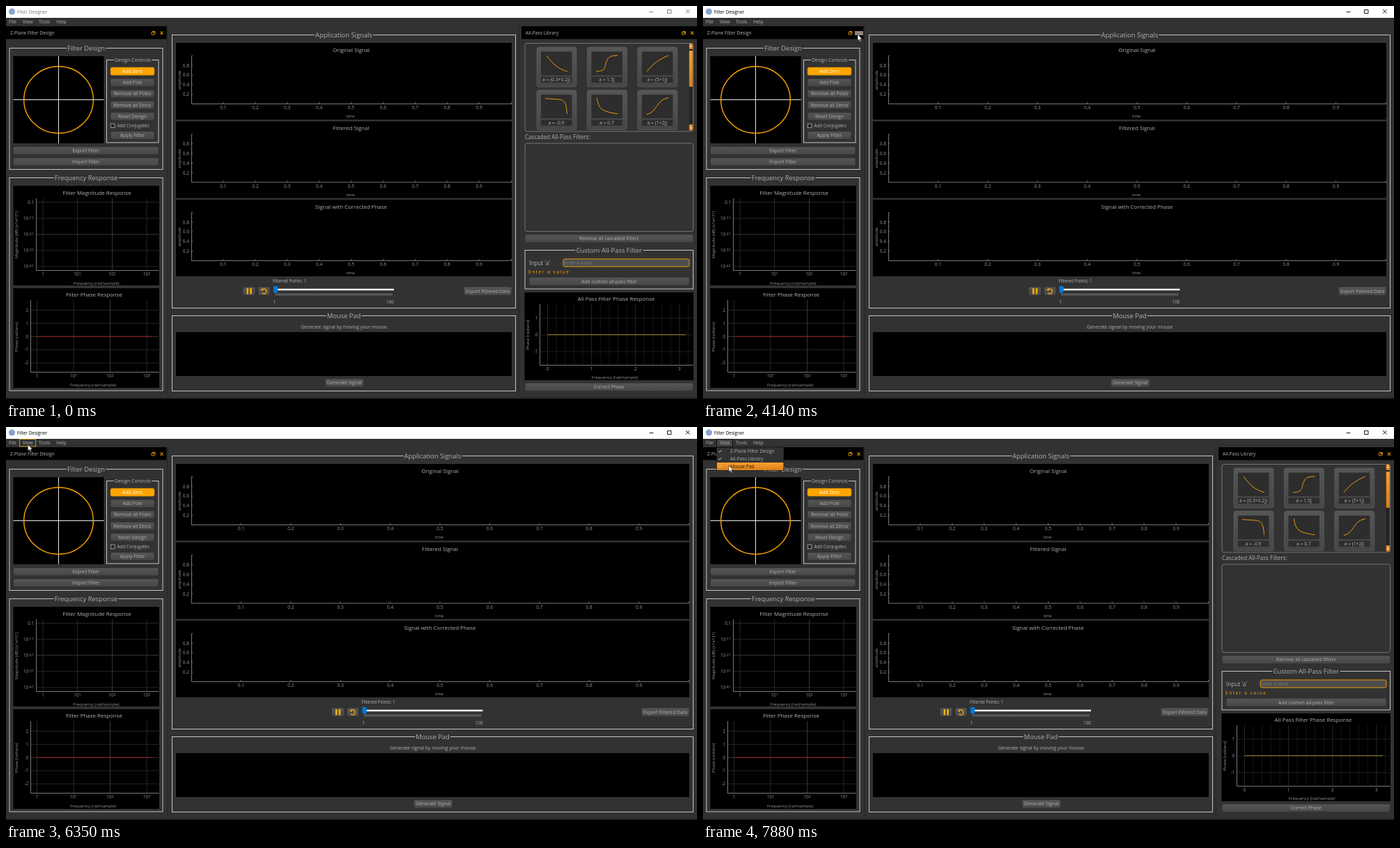
An HTML page that plays this animation: 992 by 564 pixels, repeating every 8 s.

```html
<!DOCTYPE html>
<html lang="en">
<head>
<meta charset="utf-8">
<title>Filter Designer</title>
<style>
html, body { margin: 0; width: 100%; height: 100%; overflow: hidden; background: #323232; }
svg { display: block; width: 100vw; height: 100vh; }
text { font-family: "Open Sans", "Noto Sans", sans-serif; white-space: pre; }
.layer { animation: 8s step-end infinite; }
#cursor { animation: move 8s linear infinite; }
</style>
</head>
<body>
<svg id="stage" viewBox="0 0 992 564" xmlns="http://www.w3.org/2000/svg"></svg>
<script>
const BG = '#323232', INK = '#b1b1b1', AXIS = '#969696', ORANGE = '#ffa500';
const LOOP = 8000;
const css = [];

// Drawing helpers: boxes take two corners, text takes its visual middle line.
const box = (x, y, x2, y2, fill, extra = '') =>
  `<rect x="${x}" y="${y}" width="${x2 - x}" height="${y2 - y}" fill="${fill}" ${extra}/>`;
const path = (d, color, w = 1, extra = '') =>
  `<path d="${d}" fill="none" stroke="${color}" stroke-width="${w}" ${extra}/>`;
const text = (x, y, s, size = 6.8, fill = INK, anchor = 'middle', extra = '') =>
  `<text x="${x}" y="${y + size * 0.36}" font-size="${size}" fill="${fill}" text-anchor="${anchor}" ${extra}>${s}</text>`;
const left = (x, y, s, size, fill, extra) => text(x, y, s, size, fill, 'start', extra);
const vertical = (x, y, s, size = 6) =>
  text(x, y, s, size, AXIS, 'middle', `transform="rotate(-90 ${x} ${y})"`);
const button = (x, y, x2, y2, s, on) =>
  box(x, y, x2, y2, on ? ORANGE : 'url(#btn)', `rx="2.5" stroke="${on ? '#c98200' : '#262626'}" stroke-width=".5"`) +
  text((x + x2) / 2, (y + y2) / 2, s, 6.8, on ? '#fff' : INK);
const group = (x, y, x2, y2, title, size = 9.4) =>
  box(x + .5, y + .5, x2 - .5, y2 - .5, 'none', 'stroke="#c4c4c4"') +
  text((x + x2) / 2, y + .3, title, size, INK, 'middle', `stroke="${BG}" stroke-width="4" paint-order="stroke"`);
const power = e => `10<tspan font-size="5.4" dy="-1.2">${e}</tspan>`;
const dockBar = (x, x2, s) =>
  box(x, 29, x2, 47.5, '#000') + left(x + 6, 38.7, s, 6.7) +
  path(`M${x2 - 21.5} 37.5h4v3.5h-4zM${x2 - 20.5} 36.5h4v3.5`, ORANGE, .8) +
  path(`M${x2 - 9} 36.5l4 4.5m0-4.5l-4 4.5`, ORANGE, 1.1);
const frame = (x, y, x2, y2) => box(x, y, x2, y2, 'none', 'rx="3" stroke="#858585" stroke-width=".8"');

// Wraps content in a layer shown only during the given [from, to] spans in ms.
let layers = 0;
function during(spans, content) {
  const name = 'show' + layers++;
  const at = (ms, v) => `${ms / LOOP * 100}%{visibility:${v}}`;
  let keys = spans[0][0] > 0 ? at(0, 'hidden') : '';
  for (const [from, to] of spans) keys += at(from, 'visible') + (to < LOOP ? at(to, 'hidden') : '');
  css.push(`@keyframes ${name}{${keys}}`);
  return `<g class="layer" style="animation-name:${name}">${content}</g>`;
}

function signalPlot(x, x2, y, title) {
  const ax = x + 22, end = x2 - 1, step = (end - ax) / 10, mid = (ax + end) / 2;
  let s = box(x, y, x2, y + 110, '#000') + text(mid, y + 10, title, 7.95);
  let d = `M${ax + 2} ${y + 18.5}H${ax + .5}V${y + 87.5}H${end + .5}v-2.5`;
  for (let i = 1; i < 10; i++) {
    d += `M${ax + i * step} ${y + 87}v-2`;
    s += text(ax + i * step, y + 92.8, '0.' + i, 6.6, AXIS);
  }
  for (let i = 1; i < 5; i++) {
    const ty = y + 87.5 - i * 13.8;
    d += `M${ax} ${ty}h2`;
    s += text(ax - 3, ty, '0.' + i * 2, 6.6, AXIS, 'end');
  }
  return s + path(d, AXIS, .8) + vertical(x + 5, y + 53.5, 'amplitude', 5.8) + text(mid - 1, y + 105, 'time', 5.8, AXIS);
}

function center(x, x2) {
  const c = (x + x2) / 2, px = x + 6, px2 = x2 - 6;
  let s = group(x, 41, x2, 434, 'Application Signals');
  ['Original Signal', 'Filtered Signal', 'Signal with Corrected Phase'].forEach((name, i) =>
    s += signalPlot(px, px2, 53 + i * 112.5, name));
  s += left(c - 102, 394.8, 'Filtered Points: 1', 6.2);
  s += button(c - 145, 403, c - 127, 415.5, '') + button(c - 123, 403, c - 106, 415.5, '');
  s += box(c - 139.5, 405, c - 137, 413.5, '#ffb000') + box(c - 134.8, 405, c - 132.3, 413.5, '#ffb000');
  s += path(`M${c - 117.5} 411.8A3.6 3.6 0 1 0 ${c - 117.6} 407.2`, '#ffb000', 1.3);
  s += `<path d="M${c - 119.6} 407.5l3.6 1.2.2-3.6z" fill="#ffb000"/>`;
  s += box(c - 99, 405.7, c + 72, 408.2, '#f0f0f0');
  s += path(`M${c - 98} 414H${c + 70}`, '#7c7c7c', 3, 'stroke-dasharray=".9 .8"');
  s += `<path d="M${c - 101} 402h6.2v8l-3.1 3-3.1-3z" fill="#0078d7"/>`;
  s += text(c - 99.5, 425, '1', 6.4) + text(c + 66.5, 425, '100', 6.4);
  s += button(px2 - 69, 403, px2, 415.5, 'Export Filtered Data');
  s += group(x, 444, x2, 553, 'Mouse Pad') + text(c, 461, 'Generate signal by moving your mouse');
  return s + box(px, 468, px2, 531, '#000') + button(c - 27, 535, c + 28.5, 547, 'Generate Signal');
}

function logPlot(o) {
  let s = box(10.5, o.y, 220, o.y + 143, '#000') + text(o.title[0], o.title[1], o.title[2], 7.95);
  const bottom = o.bottom + .5, ax = o.x + .5;
  o.rows.forEach(([ty, label], i) => {
    s += path(`M${ax} ${ty}H219`, i === 2 ? '#484848' : '#303030', .8);
    s += text(o.x - 3, ty, label, 6.2, AXIS, 'end');
  });
  o.cols.forEach((tx, i) => {
    s += path(`M${tx} ${o.top}V${bottom}`, i === 2 ? '#444' : '#303030', .8);
    s += text(tx, bottom + 5.2, i ? power(i === 3 ? 3 : i) : '1', 6.2, AXIS);
  });
  return s + path(`M${ax} ${o.top}V${bottom}H219.5`, AXIS, .8) +
    text(o.mid, bottom + 18, 'Frequency (rad/sample)', 6, AXIS) + vertical(15, o.rows[2][0] + .5, o.label);
}

function leftDock() {
  let s = dockBar(0, 230.5, 'Z-Plane Filter Design') + box(231, 29, 232.3, 559, '#282828');
  s += group(4.5, 60, 225.5, 235, 'Filter Design') + box(10.5, 72, 140.5, 197, '#000');
  s += path('M75.5 72V197M10.5 134.5H140.5', '#e8e8e8');
  s += `<ellipse cx="75.5" cy="134.7" rx="49.8" ry="47.9" fill="none" stroke="${ORANGE}" stroke-width="1.4"/>`;
  s += group(144, 77, 219.5, 196.5, 'Design Controls', 7);
  ['Add Zero', 'Add Pole', 'Remove all Poles', 'Remove all Zeros', 'Reset Design'].forEach((name, i) =>
    s += button(150, 88 + i * 16.2, 213, 99.3 + i * 16.2, name, i === 0));
  s += box(150.3, 169, 156, 174.7, '#222', `stroke="${INK}" stroke-width=".8"`) + left(159.5, 172, 'Add Conjugates', 6.3);
  s += button(150, 180, 213, 191.3, 'Apply Filter');
  s += button(10.5, 202, 219, 213.3, 'Export Filter') + button(10.5, 218, 219, 229.3, 'Import Filter');
  s += group(4.5, 246, 225.5, 552.5, 'Frequency Response');
  s += logPlot({ y: 258, x: 43, top: 276, bottom: 379, mid: 129.5, title: [130.5, 268, 'Filter Magnitude Response'],
    cols: [53, 102.5, 152.5, 202], label: 'Magnitude (dB) (x1e+21)',
    rows: ['0.1', power('-11'), power('-21'), power('-31'), power('-41')].map((v, i) => [281.5 + i * 23.1, v]) });
  s += logPlot({ y: 405, x: 35, top: 422, bottom: 525, mid: 125, title: [126.5, 414, 'Filter Phase Response'],
    cols: [44.5, 97, 149.5, 202], label: 'Phase (radians)',
    rows: [2, 1, 0, -1, -2].map(v => [474.3 - v * 18.9, v]) });
  return s + path('M44.5 474.3H210', '#a01c1c');
}

function rightDock() {
  let s = dockBar(740, 992, 'All-Pass Library') + box(735.5, 29, 737, 559, '#282828') + frame(745, 53.5, 986.5, 180);
  const tiles = [
    ['(0.3+0.2j)', 'M14 12C23 24 30 31 44 35'],
    ['1.5j', 'M13 35C29 34 24 27 28 20C30 14 34 12 44 12'],
    ['(5+1j)', 'M13 35C23 23 30 18 44 12'],
    ['-0.9', 'M12 12L26 13C40 13 42 16 43.5 34'],
    ['0.7', 'M14 11C16 26 20 31 44 34'],
    ['(1+2j)', 'M13 35C29 31 26 14 44 11']];
  tiles.forEach(([name, curve], i) => {
    s += `<g transform="translate(${762 + i % 3 * 72.4} ${i < 3 ? 59 : 120.7})">` +
      box(0, 0, 57, 57, 'url(#btn)', 'rx="3" stroke="#6a6a6a" stroke-width=".5"') +
      box(6, 6.5, 50.5, 40.5, '#2d2d2d') + box(6, 42.5, 50.5, 51, '#2d2d2d') +
      path(curve, ORANGE, .9) + text(28, 46.6, 'a = ' + name) + '</g>';
  });
  s += box(980.8, 54, 985.7, 179.5, '#242424');
  for (const [a, b] of [[54, 62], [64, 116], [170, 179]]) s += box(980.8, a, 985.7, b, 'url(#hot)', 'rx="1"');
  s += path('M982 59l1.3-2 1.3 2M982 174l1.3 2 1.3-2', '#fff', .8);
  s += left(745, 188.5, 'Cascaded All-Pass Filters:', 8.05) + frame(745, 197, 986.5, 323.5);
  s += button(745, 328, 986.5, 339.7, 'Remove all cascaded filters');
  s += group(744.5, 350, 987, 406.5, 'Custom All-Pass Filter') + left(751, 369, "Input 'a'", 8.2);
  s += box(800, 363, 981, 374, '#4d4d4d', `rx="2.5" stroke="${ORANGE}" stroke-width=".9"`);
  s += left(801.5, 368.8, 'Enter a value', 6.5, '#7d7d7d');
  s += left(750, 381.6, 'Enter a value', 6.4, ORANGE, 'letter-spacing="1.6"');
  s += button(751, 389.3, 981, 401, 'Add custom all-pass filter');
  s += box(744.5, 411, 987, 537, '#000') + text(876, 420, 'All Pass Filter Phase Response', 7.95);
  for (let i = 0; i < 17; i++)
    s += path(`M${777.5 + i * 12.62} 428V515`, i % 5 ? '#1c1c1c' : '#303030', .8);
  for (let v = -1; v < 2; v++) {
    s += path(`M767 ${472 - v * 24}H986`, '#262626', .8) + text(763.5, 472 - v * 24, v, 6.4, AXIS, 'end');
  }
  for (let v = 0; v < 4; v++) s += text(777.5 + v * 63.1, 520.3, v, 6.4, AXIS);
  s += path('M766.5 428V515.5H986.5', AXIS, .8) + path('M777.5 471.7H976', '#a08428');
  s += text(874, 533, 'Frequency [rad/sample]', 6, AXIS) + vertical(749, 472, 'Phase [radians]');
  return s + button(745, 541, 986.5, 552.7, 'Correct Phase');
}

const caption = color => left(16, 8.2, 'Filter Designer', 6.4, color) +
  path('M923.5 8.5h6M949.5 5.5h5.5v5h-5.5zM976 5l5.5 5.5m0-5.5l-5.5 5.5', color, .9);

const closeHover = x => box(x - 5, 36, x + 7, 42, '#858585') +
  path(`M${x - 1} 36.8l4 4.2m0-4.2l-4 4.2`, '#c88a1c', 1);

const menuItems = ['Z-Plane Filter Design', 'All-Pass Library', 'Mouse Pad'];
const check = row => path(`M22.3 ${34.6 + row * 11}l1.5 1.5 2.8-3`, '#d0d0d0', 1);

function menu() {
  const hover = [
    [[5630, 5940], [6560, 6760], [7640, 7760]],
    [[6760, 6970], [7760, 7850]],
    [[7850, LOOP]]];
  const checked = [[[6000, LOOP]], [[7000, LOOP]], [[0, LOOP]]];
  const open = [[5200, 5940], [6470, 6970], [7480, LOOP]];
  let s = during(open,
    box(19.5, 17.5, 42.5, 28.5, '#444', 'stroke="#111"') + left(24, 23, 'View') +
    box(19.3, 29, 116, 62, BG, 'stroke="#111" stroke-width=".8"') +
    menuItems.map((name, i) => left(39, 34.6 + i * 11, name, 6.7)).join(''));
  menuItems.forEach((name, i) => s += during(hover[i],
    box(19.8, 29 + i * 11, 115.5, 40 + i * 11, 'url(#hot)') + left(39, 34.6 + i * 11, name, 6.7, '#2a1a00')));
  // A tick shows wherever the menu is open and the item is already checked.
  menuItems.forEach((_, i) => {
    const from = checked[i][0][0];
    s += during(open.filter(([a]) => a >= from), check(i));
  });
  return s;
}

// Pointer track: [ms, x, y]
const track = [
  [1220, 906, 184], [1460, 925, 140], [1720, 962, 75], [1970, 983, 45], [2090, 984.5, 41], [2390, 984.5, 41],
  [2520, 830, 62], [2700, 420, 100], [2830, 268, 104], [3010, 250, 80], [3200, 227, 49], [3320, 221, 38],
  [3510, 221, 37], [3690, 222, 40], [4200, 222, 40.5], [4400, 150, 52], [4600, 85, 46], [4720, 58, 38],
  [5050, 33, 24], [5250, 32, 24], [5570, 43, 27.5], [5690, 46, 32], [6110, 46, 32], [6300, 31.5, 25],
  [6500, 31, 25], [6700, 35, 37], [6850, 36, 45], [6970, 36, 44], [7150, 36, 44], [7340, 31.5, 25],
  [7520, 31, 25], [7710, 35, 36], [7770, 36, 42], [7880, 37, 55], [8000, 37, 55]];
css.push('@keyframes move{' + [[0, 906, 184], ...track].map(([ms, x, y]) =>
  `${ms / LOOP * 100}%{transform:translate(${x}px,${y}px)}`).join('') + '}');

let art = `<defs>
<linearGradient id="btn" x2="0" y2="1"><stop stop-color="#565656"/><stop offset="1" stop-color="#464646"/></linearGradient>
<linearGradient id="hot" x2="0" y2="1"><stop stop-color="#ffa02f"/><stop offset="1" stop-color="#d7801a"/></linearGradient>
</defs>`;
art += box(0, 0, 992, 564, BG) + box(0, 562, 992, 564, '#241f1f') + box(0, 0, 992, 17, '#fff');
art += '<circle cx="8.5" cy="8" r="4.6" fill="#86a4d2"/>';
art += during([[0, 2090]], caption('#777')) + during([[2090, LOOP]], caption('#000'));
[[4, 'File'], [24, 'View'], [47, 'Tools'], [72, 'Help']].forEach(([x, s]) => art += left(x, 23, s));
art += during([[0, 2210], [6970, LOOP]], center(238, 732) + rightDock());
art += during([[2210, 4200], [5940, 6970]], center(238, 987));
art += during([[4200, 5940]], center(4.5, 987));
art += during([[0, 4200], [5940, LOOP]], leftDock());
art += during([[2030, 2210]], closeHover(983.5)) + during([[3270, 4200]], closeHover(223));
art += during([[4900, 5200], [6240, 6470], [7300, 7480]],
  box(19.5, 17.5, 42.5, 28, 'none', 'stroke="#e09a10" stroke-width=".9"'));
art += menu();
art += during([[1220, LOOP]],
  '<path id="cursor" d="M0 0V9.3L2.1 7.4 3.6 10.7 5.1 10 3.7 6.9H6.6Z" fill="#fff" stroke="#111" stroke-width=".6"/>');

const style = document.createElement('style');
style.textContent = css.join('\n');
document.head.append(style);
document.getElementById('stage').innerHTML = art;
</script>
</body>
</html>
```
